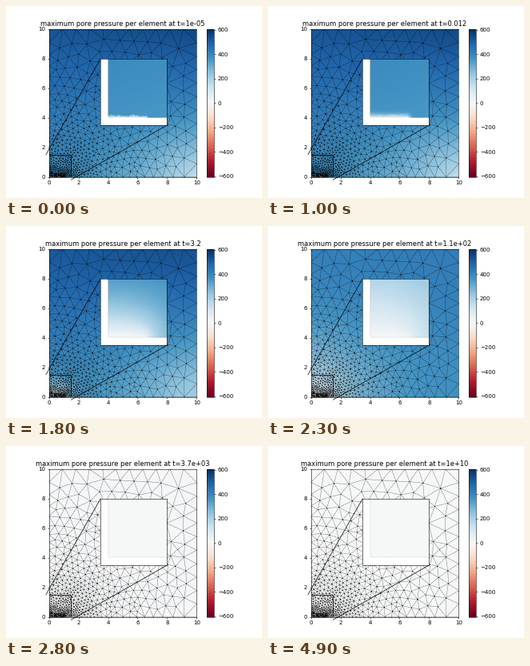
A matplotlib script for the animation above (5 s loop, 320 by 240 pixels).

```python
import numpy as np
import matplotlib.pyplot as plt
from matplotlib.animation import FuncAnimation
from matplotlib.tri import Triangulation

SIZE = 10.0          # edge of the square domain
STRIP = 1.0          # drained part of the bottom edge
DRAIN_TIME = 941.0   # slowest decay time
P_MAX = 606
FRAMES = 50
TIMES = np.logspace(-5, 10, FRAMES)
rng = np.random.default_rng(4)


def spacing(x, y):
    """Wanted element size, growing away from the drained strip."""
    distance = np.hypot(np.maximum(x - STRIP, 0), y)
    return np.minimum(0.06 + 0.09 * distance, 0.9)


def graded(size_at):
    """Points on [0, SIZE] spaced according to size_at."""
    s = np.linspace(0, SIZE, 4001)
    count = np.concatenate([[0], np.cumsum(np.diff(s) / size_at(s[1:]))])
    n = int(round(count[-1]))
    points = np.interp(np.linspace(0, count[-1], n + 1), count, s)
    points[-1] = SIZE
    return points


def boundary_points():
    bottom = graded(lambda s: spacing(s, 0))
    left = graded(lambda s: spacing(0, s))[1:]
    right = graded(lambda s: spacing(SIZE, s))[1:]
    top = graded(lambda s: spacing(s, SIZE))[1:-1]
    edges = [(bottom, 0 * bottom), (0 * left, left),
             (0 * right + SIZE, right), (top, 0 * top + SIZE)]
    return np.vstack([np.column_stack(e) for e in edges])


def make_mesh():
    border = boundary_points()
    points = np.empty((6000, 2))
    n = len(border)
    points[:n] = border
    for box, tries in (((1.6, 0.6), 6000), ((3, 3), 6000), ((10, 10), 8000)):
        for p in rng.uniform(0, 1, (tries, 2)) * box:
            h = 0.77 * spacing(*p)
            if min(p[0], p[1], SIZE - p[0], SIZE - p[1]) < 0.7 * h:
                continue
            if ((points[:n] - p) ** 2).sum(axis=1).min() > h * h:
                points[n] = p
                n += 1
    points = points[:n]

    # Laplacian smoothing of the inner nodes
    for _ in range(8):
        edges = Triangulation(*points.T).edges
        total, degree = np.zeros((n, 2)), np.zeros(n)
        for a, b in (edges.T, edges.T[::-1]):
            np.add.at(total, a, points[b])
            np.add.at(degree, a, 1)
        inner = slice(len(border), n)
        points[inner] = total[inner] / degree[inner, None]
    return Triangulation(*points.T)


def assemble(mesh):
    """Linear stiffness matrix and lumped mass."""
    n = len(mesh.x)
    stiffness, mass = np.zeros((n, n)), np.zeros(n)
    for tri in mesh.triangles:
        x, y = mesh.x[tri], mesh.y[tri]
        b = np.roll(y, -1) - np.roll(y, 1)
        c = np.roll(x, 1) - np.roll(x, -1)
        area = abs(b[0] * c[1] - b[1] * c[0]) / 2
        if area < 1e-9:
            continue
        stiffness[np.ix_(tri, tri)] += (np.outer(b, b) + np.outer(c, c)) / (4 * area)
        mass[tri] += area / 3
    return stiffness, mass


def initial_pressure(x, y):
    dip = 245 * np.exp(-np.hypot(SIZE - x, y) / 4.2)
    return 385 + 14.5 * y + 0.42 * x * y - dip


def solve(mesh):
    """Pressure at the nodes for every time, by modal decay."""
    stiffness, mass = assemble(mesh)
    free = ~((mesh.y < 1e-9) & (mesh.x <= STRIP + 0.01))
    root = np.sqrt(mass[free])
    rates, modes = np.linalg.eigh(stiffness[np.ix_(free, free)] / np.outer(root, root))
    rates /= rates[0] * DRAIN_TIME
    weights = modes.T @ (root * initial_pressure(mesh.x, mesh.y)[free])
    decay = np.exp(-np.outer(rates, TIMES))
    pressure = np.zeros((len(mesh.x), FRAMES))
    pressure[free] = modes @ (weights[:, None] * decay) / root[:, None]
    return pressure.T


mesh = make_mesh()
pressure = solve(mesh)

fig, ax = plt.subplots(figsize=(6.4, 4.8), dpi=50)
style = dict(shading="gouraud", cmap="RdBu", vmin=-P_MAX, vmax=P_MAX)
field = ax.tripcolor(mesh, pressure[0], **style)
ax.triplot(mesh, "k.--", lw=0.5, ms=1.5, mew=0)
ax.set(xlim=(0, SIZE), ylim=(0, SIZE), aspect="equal")
fig.colorbar(field, ax=ax)
title = ax.set_title("")

inset = ax.inset_axes([3.5, 3.5, 4.5, 4.5], transform=ax.transData)
zoomed = inset.tripcolor(mesh, pressure[0], **style)
inset.plot([0, 0, 1.5], [1.5, 0, 0], color="0.6", lw=0.6, ls=":")
inset.set(xlim=(-0.2, 1.5), ylim=(-0.2, 1.5), xticks=[], yticks=[])
ax.indicate_inset_zoom(inset, edgecolor="black", alpha=1)


def update(i):
    field.set_array(pressure[i])
    zoomed.set_array(pressure[i])
    title.set_text(f"maximum pore pressure per element at t={TIMES[i]:.2g}")
    return field, zoomed, title


anim = FuncAnimation(fig, update, frames=FRAMES, interval=100, repeat=True)
plt.show()
```
